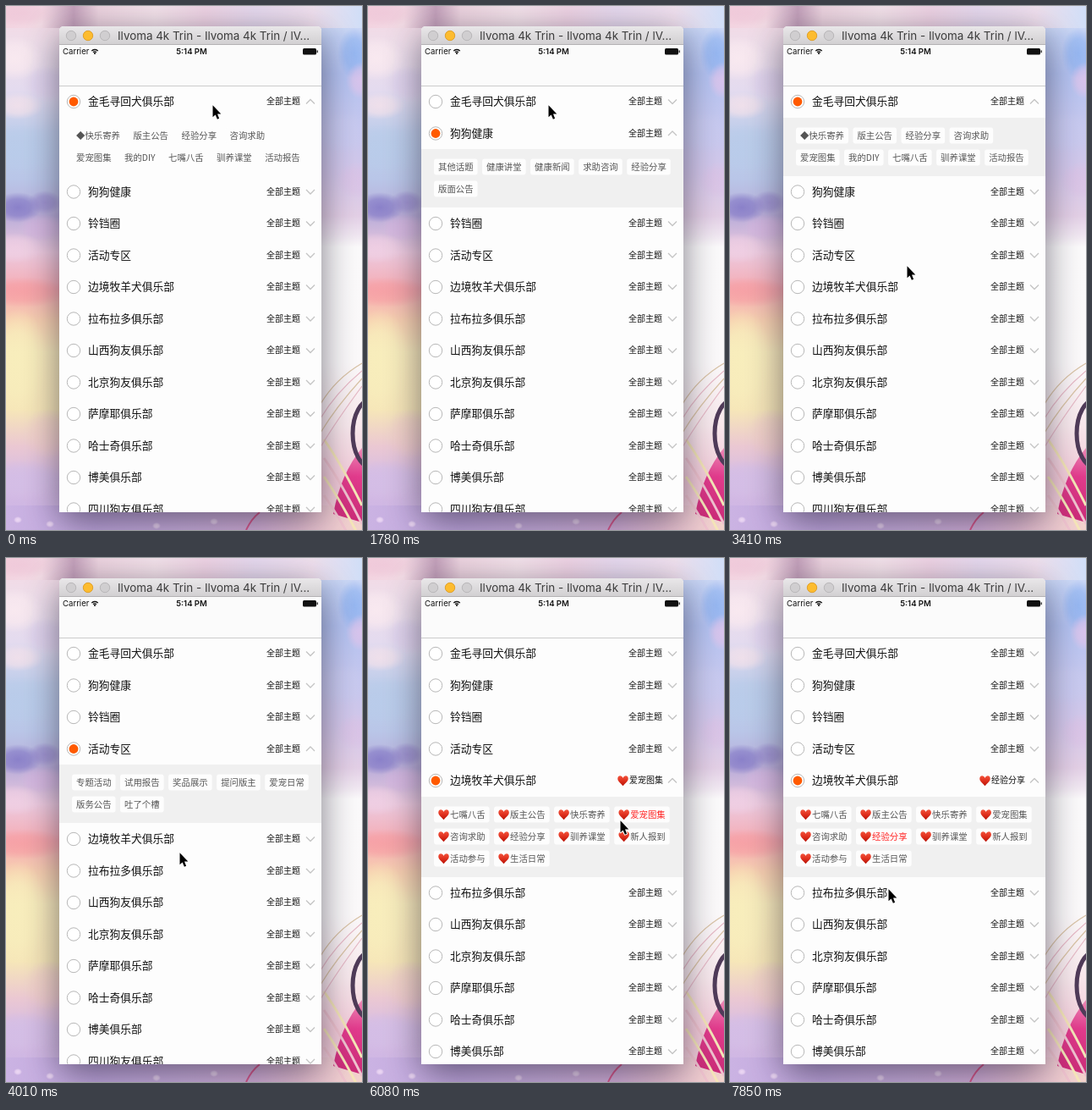
An HTML page with a canvas for the animation above (8 s loop, 421 by 619 pixels).

```html
<!DOCTYPE html>
<html lang="zh-CN">
<head>
<meta charset="utf-8">
<title>Accordion list</title>
<style>
html, body { margin: 0; width: 100%; height: 100%; overflow: hidden; }
canvas { display: block; width: 421px; height: 619px; }
</style>
</head>
<body>
<canvas id="stage" width="421" height="619"></canvas>
<script>
const W = 421, H = 619, LOOP = 8000;
const CJK = '"Noto Sans CJK SC", "Noto Sans CJK", sans-serif';
const LATIN = 'Inter, Roboto, sans-serif';
const WIN = { x: 63, y: 24, w: 310, h: 574 };
const PITCH = 37.5;

const rows = ['金毛寻回犬俱乐部', '狗狗健康', '铃铛圈', '活动专区', '边境牧羊犬俱乐部',
  '拉布拉多俱乐部', '山西狗友俱乐部', '北京狗友俱乐部', '萨摩耶俱乐部', '哈士奇俱乐部',
  '博美俱乐部', '四川狗友俱乐部'];
const split = s => s.split('|').map(line => line.split(' '));
const panels = {
  0: split('◆快乐寄养 版主公告 经验分享 咨询求助|爱宠图集 我的DIY 七嘴八舌 驯养课堂 活动报告'),
  1: split('其他话题 健康讲堂 健康新闻 求助咨询 经验分享|版面公告'),
  3: split('专题活动 试用报告 奖品展示 提问版主 爱宠日常|版务公告 吐了个槽'),
  4: split('♥七嘴八舌 ♥版主公告 ♥快乐寄养 ♥爱宠图集|♥咨询求助 ♥经验分享 ♥驯养课堂 ♥新人报到|♥活动参与 ♥生活日常')
};

// [time, value]
const openAt = [[0, 0], [890, 1], [2070, 0], [3560, 3], [4310, 4]];
const pickAt = [[0, ''], [5490, '♥爱宠图集'], [6670, '♥驯养课堂'], [7400, '♥经验分享']];
// Screen refreshes: [first, last, count]
const bursts = [[0, 0, 1], [440, 590, 2], [890, 890, 1], [1340, 1780, 4], [2070, 3110, 8],
  [3260, 3560, 3], [3860, 4010, 2], [4310, 5340, 8], [5490, 5490, 1], [5790, 6670, 7],
  [6960, 7400, 4], [7700, 7850, 2]];
// Pointer path: [time, x, y]
const path = [[0, 244, 117], [290, 244, 117], [590, 230, 222], [1190, 230, 222], [1780, 213, 117],
  [2070, 213, 117], [2820, 210, 220], [3110, 208, 262], [3410, 209, 307], [3710, 209, 307],
  [4010, 205, 348], [4310, 205, 348], [5050, 321, 268], [5340, 331, 299], [5640, 331, 299],
  [6520, 234, 331], [6670, 234, 331], [6960, 229, 328], [7250, 191, 330], [7550, 191, 330],
  [7850, 187, 391], [LOOP, 187, 391]];

const ticks = bursts.flatMap(([a, b, n]) =>
  Array.from({ length: n }, (_, i) => n > 1 ? Math.floor(a + (b - a) * i / (n - 1)) : a));
const lastOf = (list, t) => list.filter(e => e[0] <= t).pop()[1];

function pointerAt(t) {
  const i = path.findIndex(p => p[0] > t);
  const [t0, x0, y0] = path[i - 1], [t1, x1, y1] = path[i];
  const k = (t - t0) / (t1 - t0);
  return [Math.round(x0 + (x1 - x0) * k), Math.round(y0 + (y1 - y0) * k)];
}

let g = document.getElementById('stage').getContext('2d');

function box(x, y, w, h, r, fill) {
  g.fillStyle = fill;
  g.beginPath();
  g.roundRect(x, y, w, h, r);
  g.fill();
}

function disc(x, y, r, fill, stroke) {
  g.beginPath();
  g.arc(x, y, r, 0, 7);
  if (fill) { g.fillStyle = fill; g.fill(); }
  if (stroke) { g.strokeStyle = stroke; g.lineWidth = 1; g.stroke(); }
}

function line(points, color, width) {
  g.strokeStyle = color;
  g.lineWidth = width;
  g.beginPath();
  points.forEach(([x, y]) => g.lineTo(x, y));
  g.stroke();
}

function curve(x0, y0, cx, cy, x1, y1, color, width) {
  g.strokeStyle = color;
  g.lineWidth = width;
  g.beginPath();
  g.moveTo(x0, y0);
  g.quadraticCurveTo(cx, cy, x1, y1);
  g.stroke();
}

function text(s, x, y, font, color, align = 'left') {
  g.font = font;
  g.fillStyle = color;
  g.textAlign = align;
  g.fillText(s, x, y);
}

function ramp(x0, y0, x1, y1, stops) {
  const f = g.createLinearGradient(x0, y0, x1, y1);
  stops.forEach(([p, c]) => f.addColorStop(p, c));
  return f;
}

// Soft elliptical patch of colour
function glow(x, y, rx, ry, rgb, alpha = 1) {
  const f = g.createRadialGradient(0, 0, 0, 0, 0, 1);
  f.addColorStop(0, `rgba(${rgb},${alpha})`);
  f.addColorStop(0.55, `rgba(${rgb},${alpha * 0.75})`);
  f.addColorStop(1, `rgba(${rgb},0)`);
  g.save();
  g.translate(x, y);
  g.scale(rx, ry);
  g.fillStyle = f;
  g.fillRect(-1, -1, 2, 2);
  g.restore();
}

function heart(x, y, s) {
  g.save();
  g.translate(x, y);
  g.scale(s, s);
  g.fillStyle = ramp(0, -0.5, 0, 0.5, [[0, '#f4573f'], [0.5, '#e0301e'], [1, '#b81408']]);
  g.beginPath();
  g.moveTo(0, 0.5);
  g.bezierCurveTo(-0.25, 0.22, -0.5, 0.05, -0.5, -0.2);
  g.bezierCurveTo(-0.5, -0.55, -0.1, -0.55, 0, -0.25);
  g.bezierCurveTo(0.1, -0.55, 0.5, -0.55, 0.5, -0.2);
  g.bezierCurveTo(0.5, 0.05, 0.25, 0.22, 0, 0.5);
  g.fill();
  g.restore();
}

// Width of a label, where a leading heart counts as a 14px glyph
function labelWidth(s, font) {
  g.font = font;
  return s[0] === '♥' ? 14 + g.measureText(s.slice(1)).width : g.measureText(s).width;
}

function label(s, x, y, size, color) {
  const font = size + 'px ' + CJK;
  if (s[0] === '♥') {
    heart(x + 6.5, y, 12.5);
    x += 14;
    s = s.slice(1);
  }
  text(s, x, y + size * 0.345, font, color);
}

function drawWallpaper() {
  g.fillStyle = ramp(0, 0, 0, H, [[0, '#f3d6e2'], [0.07, '#efdeea'], [0.16, '#e4dbef'],
    [0.24, '#bfcdea'], [0.33, '#b9c6e8'], [0.4, '#b9add9'], [0.47, '#ecc9de'], [0.54, '#f5acb4'],
    [0.6, '#f7cfb0'], [0.66, '#f7e9bb'], [0.77, '#f6e6b8'], [0.84, '#ebc8d2'], [0.9, '#d6bce4'],
    [1, '#cbb3e3']]);
  g.fillRect(0, 0, 220, H);
  g.fillStyle = ramp(0, 0, 0, H, [[0, '#dfe6f8'], [0.06, '#c0cff4'], [0.13, '#b3c2f1'],
    [0.22, '#c4c7ef'], [0.32, '#d3c7ea'], [0.4, '#e3cfe6'], [0.44, '#f1e8f2'], [0.46, '#fbfafb'],
    [0.68, '#fbf9fa'], [0.8, '#f8e8ec'], [0.9, '#f3cbd9'], [1, '#f0cdd8']]);
  g.fillRect(220, 0, W - 220, H);

  g.fillStyle = ramp(0, 0, W, 0, [[0, '#f3d3e0'], [0.1, '#f2dae4'], [0.19, '#c3a0ba'],
    [0.26, '#ecd3df'], [0.42, '#f3e2ea'], [0.56, '#eed3e4'], [0.7, '#e6d9ee'],
    [0.86, '#f0e0ee'], [1, '#d0def7']]);
  g.fillRect(0, 0, W, 26);
  g.fillStyle = ramp(0, 0, W, 0, [[0, '#cbb3e3'], [0.25, '#bfa6dd'], [0.5, '#c9aedd'],
    [0.7, '#d4b0da'], [0.85, '#ebc4d4'], [1, '#f3d3cc']]);
  g.fillRect(0, 590, W, 29);

  glow(20, 8, 40, 16, '236,190,210', 0.5);
  glow(10, 62, 34, 26, '250,234,240', 0.9);
  glow(50, 92, 30, 22, '221,208,236', 0.9);
  glow(14, 118, 30, 16, '245,226,234', 0.8);
  glow(18, 170, 50, 30, '184,204,234', 0.8);
  glow(14, 238, 28, 18, '130,120,198', 0.85);
  glow(46, 232, 20, 14, '148,134,204', 0.7);
  glow(42, 262, 28, 16, '214,182,224', 0.8);
  glow(10, 286, 34, 18, '240,208,228', 0.8);
  glow(20, 338, 52, 18, '247,156,160', 0.7);
  glow(14, 420, 36, 62, '248,238,188', 0.9);
  glow(50, 505, 30, 30, '240,206,200', 0.7);
  glow(20, 560, 50, 24, '212,190,230', 0.9);
  glow(412, 56, 20, 30, '130,172,240', 0.65);
  glow(420, 88, 18, 22, '232,196,234', 0.7);
  glow(400, 150, 34, 24, '200,202,240', 0.7);
  glow(416, 206, 26, 22, '220,194,230', 0.7);

  drawFigure();
  [[14, 607], [52, 612], [178, 614], [246, 609]]
    .forEach(([x, y]) => glow(x, y, 5, 4, '246,226,248', 0.8));
}

// Plain pink figure at the lower right, reduced to a wedge, an arc and strands
function drawFigure() {
  g.fillStyle = ramp(0, 520, 0, 610, [[0, '#ee8cb8'], [0.4, '#e23a8c'], [1, '#c92a76']]);
  g.beginPath();
  g.moveTo(W, 522);
  g.quadraticCurveTo(396, 552, 387, 600);
  g.lineTo(W, 610);
  g.fill();
  g.strokeStyle = '#4f3a58';
  g.lineWidth = 5;
  g.beginPath();
  g.ellipse(432, 505, 22, 40, 0, 0, 7);
  g.stroke();
  for (let i = 0; i < 4; i++) {
    curve(372, 470 + i * 17, 390, 440 + i * 17, W, 422 + i * 9, i % 2 ? '#e6b9c6' : '#d9c3a6', 1.2);
    curve(376, 512 + i * 22, 396, 540 + i * 22, W, 590 + i * 22, i % 2 ? '#f0c3cf' : '#f5e6b8', 3);
  }
  curve(284, H, 290, 606, 300, 598, '#d9588c', 2);
}

function drawWindow() {
  g.save();
  g.shadowColor = 'rgba(20,16,34,0.55)';
  g.shadowBlur = 42;
  g.shadowOffsetY = 10;
  box(WIN.x, WIN.y, WIN.w, WIN.h, [5, 5, 0, 0], '#fdfdfd');
  g.restore();
  box(WIN.x, WIN.y, WIN.w, 22, [5, 5, 0, 0], ramp(0, 24, 0, 46, [[0, '#e9e7e9'], [1, '#d1cfd1']]));
  g.fillStyle = '#b4b2b4';
  g.fillRect(WIN.x, 45, WIN.w, 1);
  disc(77, 35, 5.7, '#d0ced0', '#b9b7b9');
  disc(97, 35, 5.7, '#fdbc2f', '#e0a02a');
  disc(117, 35, 5.7, '#d0ced0', '#b9b7b9');
  text('Ilvoma 4k Trin - Ilvoma 4k Trin / lV...', 132, 40, '13.4px ' + LATIN, '#3c3c3c');

  g.fillStyle = '#fbfbfb';
  g.fillRect(WIN.x, 46, WIN.w, 48);
  g.fillStyle = '#cbcbcb';
  g.fillRect(WIN.x, 94, WIN.w, 1);
  text('Carrier', 67, 57, '9.6px ' + LATIN, '#111');
  text('5:14 PM', 219.5, 57, '600 9.5px ' + LATIN, '#111', 'center');
  g.strokeStyle = '#111';
  g.lineWidth = 1.3;
  [2.6, 5].forEach(r => {
    g.beginPath();
    g.arc(105, 56.5, r, -Math.PI * 0.77, -Math.PI * 0.23);
    g.stroke();
  });
  disc(105, 56, 1.1, '#111');
  box(351, 50, 16, 7.5, 1.5, '#111');
  box(367.6, 52.2, 1.2, 3, 0.5, '#111');
}

function drawRow(i, y, open, value) {
  disc(80, y, 7.7, '#fff', '#b8b8b8');
  if (open) disc(80, y, 5.4, '#ff5a00');
  label(rows[i], 97, y, 12.75, '#111');
  const w = labelWidth(value, '10px ' + CJK);
  label(value, 348 - w + (value[0] === '♥' ? 1 : 0), y, 10, '#111');
  const d = open ? -2.5 : 2.5;
  line([[355, y - d], [360, y + d], [365, y - d]], '#c4c4c4', 1.3);
}

function drawPanel(lines, top, height, picked, fill) {
  g.fillStyle = fill;
  g.fillRect(WIN.x, top, WIN.w, height);
  lines.forEach((tags, n) => {
    const y = top + 21 + n * 26;
    let x = 78;
    tags.forEach(tag => {
      const w = labelWidth(tag, '10.4px ' + CJK) + 10;
      box(x, y - 9.5, w, 19, 3, '#fdfdfd');
      label(tag, x + 5, y, 10.4, tag === picked ? '#ff2323' : '#555');
      x += w + 5.5;
    });
  });
}

function drawPointer(x, y) {
  g.beginPath();
  [[0, 0], [0, 14], [3.1, 11.2], [5.4, 16.4], [7.6, 15.4], [5.5, 10.3], [9.8, 10.3]]
    .forEach(([dx, dy]) => g.lineTo(x + 0.5 + dx, y + 0.3 + dy));
  g.closePath();
  g.lineJoin = 'round';
  g.strokeStyle = '#fff';
  g.lineWidth = 2;
  g.stroke();
  g.fillStyle = '#000';
  g.fill();
}

// The wallpaper and window frame never change, so they are drawn once
const backdrop = document.createElement('canvas');
backdrop.width = W;
backdrop.height = H;
const screen = g;
g = backdrop.getContext('2d');
drawWallpaper();
drawWindow();
g = screen;

function draw(time) {
  const t = ticks.filter(k => k <= time).pop();
  const open = lastOf(openAt, t), picked = lastOf(pickAt, t);
  g.drawImage(backdrop, 0, 0);
  g.save();
  g.beginPath();
  g.rect(WIN.x, 95, WIN.w, 503);
  g.clip();
  let y = 113;
  rows.forEach((_, i) => {
    drawRow(i, y, i === open, i === open && picked || '全部主题');
    if (i === open) {
      const height = 17 + panels[i].length * 26;
      drawPanel(panels[i], Math.round(y + PITCH / 2), height, picked, t < 890 ? '#fdfdfd' : '#f0f0f0');
      y += height;
    }
    y += PITCH;
  });
  g.restore();
  drawPointer(...pointerAt(t));
}

function frame(now) {
  draw(now % LOOP);
  requestAnimationFrame(frame);
}
requestAnimationFrame(frame);
</script>
</body>
</html>
```
